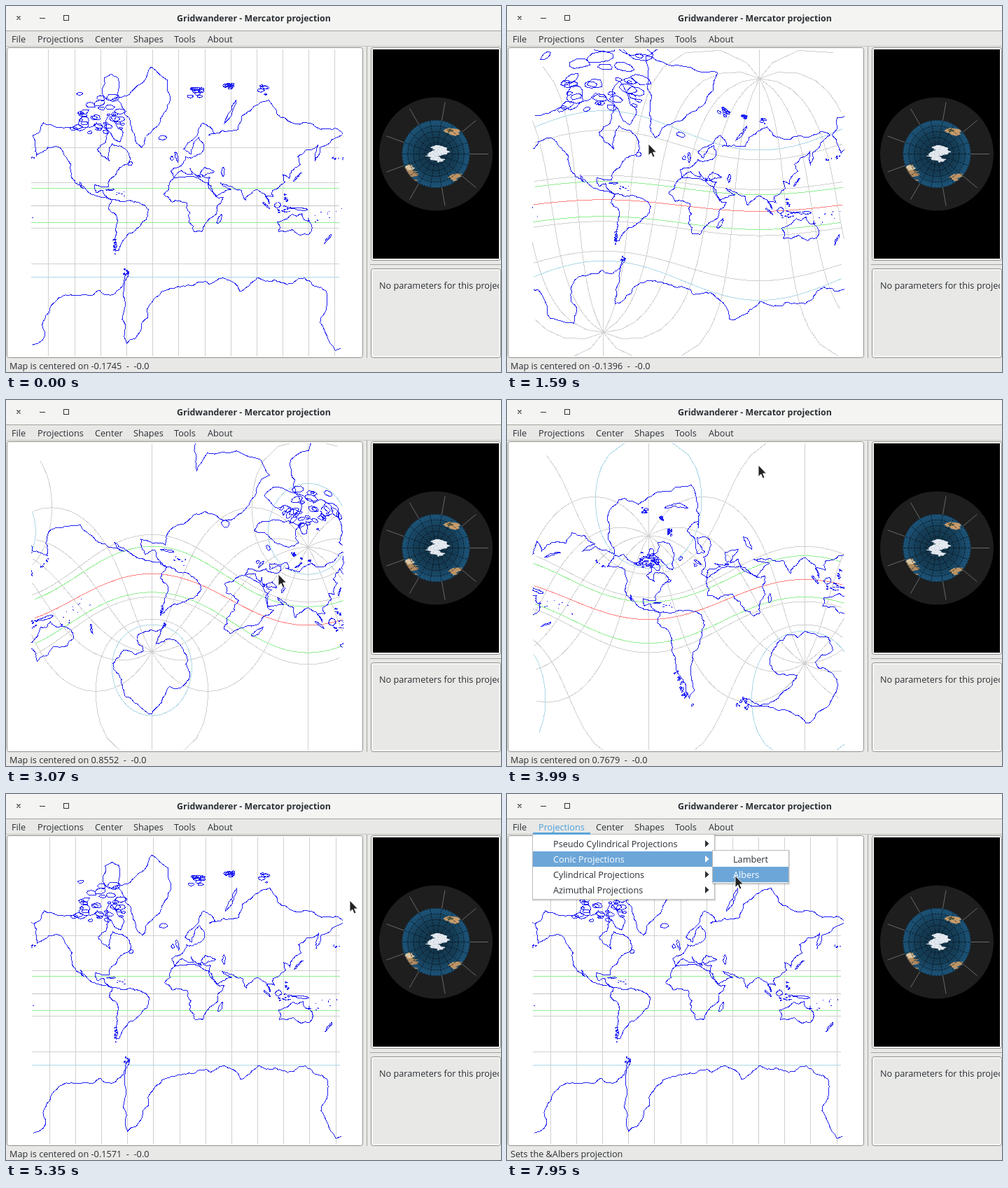
An HTML page that plays this animation: 707 by 523 pixels, repeating every 7.99 s.

```html
<!DOCTYPE html>
<html lang="en">
<head>
<meta charset="utf-8">
<title>Map projections</title>
<style>
html, body { margin: 0; width: 100%; height: 100%; overflow: hidden; background: #e8e8e6; }
svg { display: block; width: 100vw; height: 100vh; }
text { font: 12.7px 'Open Sans', 'Noto Sans', sans-serif; fill: #2a2f33; white-space: pre; }
.bold { font-weight: bold; font-size: 12.4px; text-anchor: middle; }
.thin { fill: none; stroke-width: 1; shape-rendering: crispEdges; }
</style>
</head>
<body>
<svg viewBox="0 0 707 523" xmlns="http://www.w3.org/2000/svg">
  <defs>
    <clipPath id="mapClip"><rect x="36" y="62" width="447" height="438"/></clipPath>
    <clipPath id="noteClip"><rect x="524" y="378" width="180" height="120"/></clipPath>
    <clipPath id="earthClip"><circle cx="614" cy="211.5" r="48.5"/></clipPath>
    <radialGradient id="sea"><stop offset="0" stop-color="#123247"/><stop offset=".6" stop-color="#153d56"/><stop offset="1" stop-color="#1d557a"/></radialGradient>
  </defs>
  <rect width="707" height="523" fill="#e8e8e6"/>
  <rect width="707" height="35" fill="#f4f4f3"/>
  <path class="thin" stroke="#a2a29e" d="M0 35.5H707"/>
  <path class="thin" stroke="#c4c4c0" d="M0 57.5H707"/>
  <path d="M15.5 14.5l5 5m0-5l-5 5M48 17.5h8" stroke="#333" stroke-width="1.2" fill="none"/>
  <rect class="thin" x="82.5" y="13.5" width="7" height="7" stroke="#333"/>
  <text class="bold" x="354" y="22">Gridwanderer - Mercator projection</text>
  <g id="bar"></g>

  <rect x="1.5" y="59.5" width="508" height="443" rx="3" fill="#fff" stroke="#92928e"/>
  <path class="thin" stroke="#a4a4a0" d="M515.5 58V503M520 369.5H707"/>
  <rect x="521.5" y="59.5" width="185" height="304" rx="3" fill="#f6f6f5" stroke="#92928e"/>
  <rect x="524" y="62" width="180" height="299"/>
  <rect x="521.5" y="375.5" width="185" height="127" rx="3" fill="#f6f6f5" stroke="#92928e"/>
  <rect x="524" y="378" width="180" height="122" fill="#e8e8e6"/>
  <text x="533" y="404" clip-path="url(#noteClip)">No parameters for this projection</text>

  <g id="globe"></g>
  <g id="map" clip-path="url(#mapClip)"></g>
  <text id="status" x="5" y="519"></text>

  <g id="menu">
    <rect x="36" y="58" width="262" height="95" fill="#000" opacity=".13"/>
    <rect x="36.5" y="57.5" width="260" height="93" fill="#fff" stroke="#b9b9b6"/>
    <rect x="37" y="55" width="82" height="3" fill="#5ba5da"/>
  </g>
  <g id="submenu">
    <rect x="294" y="81" width="110" height="49" fill="#000" opacity=".13"/>
    <rect x="293.5" y="80.5" width="109" height="47" fill="#fff" stroke="#b9b9b6"/>
  </g>
  <path id="cursor" d="M0 0V16.5L3.8 13L6.3 19L9 17.8L6.5 12H11.5Z" fill="#222" stroke="#fff" stroke-width=".9"/>
</svg>
<script>
const $ = id => document.getElementById(id);
const RAD = Math.PI / 180, LOOP = 7990;

function add(parent, tag, attrs, label) {
  const el = document.createElementNS('http://www.w3.org/2000/svg', tag);
  for (const k in attrs) el.setAttribute(k, attrs[k]);
  if (label) el.textContent = label;
  return parent.appendChild(el);
}

let seed = 11;
const rnd = () => (seed = seed * 16807 % 2147483647) / 2147483647;
const spread = w => (rnd() * 2 - 1) * w;
const range = (from, to, step) => Array.from({ length: (to - from) / step + 1 }, (_, i) => from + i * step);

// Corners of the mainlands as longitude, latitude; the coast between them is fractal
const corners = {
  northAmerica: [-168,66,-156,71,-115,68,-95,71,-82,68,-94,59,-80,51,-77,62,-65,60,-56,52,-65,47,-81,31,-81,25,-97,28,-95,18,-88,21,-83,10,-77,8,-105,20,-114,31,-110,23,-124,40,-124,48,-135,59,-151,60,-164,55,-168,66],
  southAmerica: [-77,8,-52,5,-35,-6,-41,-22,-58,-36,-69,-51,-73,-52,-71,-18,-81,-5,-77,8],
  greenland: [-32,83.6,-13,81.5,-22,71,-43,60,-54,69,-72,78,-32,83.6],
  eurasia: [28,71,41,67,34,66,68,68.5,72,73,104,77.5,130,71,180,69,190,66,163,60,157,51,160,61,137,54,140,48,128,40,127,35,120,39,122,31,108,21,109,12,100,13,104,2,97,17,90,22,77,8,72,21,57,26,48,30,60,22,44,13,34,30,36,36,27,37,41,42,30,46,23,37,13,45,16,39,3,43,-6,36,-9,43,-1,46,8,54,20,54.5,29,60,23,65,17,61,14,56,6,59,28,71],
  africa: [34,30,10,37,-10,31,-17,15,-8,5,9,4,13,-10,18,-34,26,-34,40,-15,51,11,43,12,34,30],
  australia: [114,-22,115,-34,131,-32,140,-38,150,-37,153,-26,142,-11,136,-15,131,-12,114,-22],
  antarctica: [-180,-84.5,-157,-83,-150,-78,-138,-74,-75,-73,-58,-64,-62,-75,-60,-83.5,-36,-79,-10,-71,50,-67,70,-72,90,-67,145,-67,170,-72,163,-80,180,-84.5]
};

// Larger islands: longitude, latitude, half width, half height, lean
const islands = [
  [-74,68,8,5,-6], [-78,80,10,2.5], [-110,71,7,2], [-56,49,2.5,1.5], [-19,65,5,1.3],
  [-2.5,54,1.8,4,-1.5], [-8,53,2,1.5], [59,74,2,3,6], [137,37,1.2,5,5], [47,-19,2,6.5,2],
  [141,-5,8,2,-4], [114,1,4,4], [101,0,1.5,5,-4], [172,-41,1,5,4.5], [-79,21.5,5,.7], [51,42,1.8,4.5]
];

// Island groups: count, longitude, latitude, spread across, spread up, size
const groupsOfIslands = [
  [34,-92,73,29,6,1.5], [18,122,-5,10,5,.9], [8,124,11,2,5,.8], [16,170,-13,24,10,.25],
  [10,-174,53,9,1,.4], [8,-66,17,6,4,.3], [16,-74,-48,1,6,.5], [12,20,79,7,1,.6],
  [10,55,80.5,7,.4,.4], [5,97,79.5,4,1,.7], [8,-60,-64,4,1.5,.4], [8,24,37,3,2,.3]
];

const pairs = flat => range(0, flat.length - 2, 2).map(i => [flat[i], flat[i + 1]]);

// Midpoint displacement from a to b, without b
function crag(a, b) {
  const wide = Math.max(.12, Math.cos(a[1] * RAD));
  const dx = (b[0] - a[0]) * wide, dy = b[1] - a[1];
  if (Math.hypot(dx, dy) < 1.1) return [a];
  const k = spread(.16);
  const mid = [(a[0] + b[0]) / 2 - dy * k / wide, (a[1] + b[1]) / 2 + dx * k];
  return [...crag(a, mid), ...crag(mid, b)];
}
const rough = pts => [...pts.slice(1).flatMap((p, i) => crag(pts[i], p)), pts[pts.length - 1]];

function blob(x, y, w, h, lean = 0) {
  const pts = range(0, 315, 45).map(deg => {
    const q = .75 + rnd() * .4, s = q * Math.sin(deg * RAD);
    return [x + w * q * Math.cos(deg * RAD) + lean * s, y + h * s];
  });
  return [...pts, pts[0]];
}

const islets = ([n, lon, lat, w, h, r]) => range(1, n, 1).map(() => {
  const x = lon + spread(w), y = lat + spread(h), q = r * (.3 + rnd());
  return blob(x, y, q / Math.cos(y * RAD), q * .5, spread(q));
});

const unit = ([lon, lat]) => {
  const c = Math.cos(lat * RAD);
  return [c * Math.cos(lon * RAD), c * Math.sin(lon * RAD), Math.sin(lat * RAD)];
};
const toUnits = lines => lines.map(l => l.map(unit));

const land = toUnits([
  ...Object.values(corners).map(c => rough(pairs(c))),
  ...islands.map(i => rough(blob(...i))),
  ...groupsOfIslands.flatMap(islets)
]);
const parallel = lat => range(-180, 180, 5).map(lon => [lon, lat]);
const meridians = range(-180, 150, 30).map(lon => range(-90, 90, 3).map(lat => [lon, lat]));
const GRAY = '#d0d0d0', GREEN = '#90ee90', BLUE = '#add8e6', RED = '#ff8080';

const layer = (stroke, lines) => ({ lines: toUnits(lines), el: add($('map'), 'path', { class: 'thin', stroke }) });
layer.all = [layer(GRAY, [...meridians, ...[-60, -30, 30, 60].map(parallel)])];
const [north, south, tropics, equator] = [[BLUE, 66.56], [BLUE, -66.56], [GREEN, 23.44, -23.44], [RED, 0]]
  .map(([color, ...lats]) => layer(color, lats.map(parallel)));
const coast = { lines: land, el: add($('map'), 'path', { class: 'thin', stroke: '#2020f4' }) };
const layers = [...layer.all, north, south, tropics, equator, coast];

// Tilt about the axis through 0,0, turn about the poles, then project from inside the globe
function trace(lines, turn, tilt) {
  const c = Math.cos(tilt), s = Math.sin(tilt);
  let d = '';
  for (const line of lines) {
    let last = 99;
    for (const [x, y, z] of line) {
      const up = z * c - y * s;
      let lon = Math.atan2(y * c + z * s, x) + turn;
      lon -= 2 * Math.PI * Math.round(lon / (2 * Math.PI));
      const px = 259.2 + 71 * lon, py = 285.1 - 72 * up / (.25 + Math.sqrt(Math.max(0, 1 - up * up)));
      d += (Math.abs(lon - last) > Math.PI ? 'M' : 'L') + px.toFixed(1) + ' ' + py.toFixed(1);
      last = lon;
    }
  }
  return d;
}

const show = (el, on) => el.setAttribute('display', on ? 'inline' : 'none');
let shown = '';
function drawMap(turn, tilt) {
  const key = turn + '/' + tilt;
  if (key === shown) return;
  shown = key;
  for (const l of layers) l.el.setAttribute('d', trace(l.lines, turn * RAD, tilt * RAD));
  show(north.el, tilt);
  equator.el.setAttribute('stroke', tilt ? RED : '#c2c2c0');
}

function drawGlobe() {
  const g = $('globe'), cx = 614, cy = 211.5;
  const rays = (step, a, b) => range(0, 360 - step, step).map(deg => {
    const c = Math.cos(deg * RAD), s = Math.sin(deg * RAD);
    return `M${cx + a * c} ${cy + a * s}L${cx + b * c} ${cy + b * s}`;
  }).join('');
  add(g, 'circle', { cx, cy, r: 81, fill: '#1e1e1e' });
  add(g, 'path', { d: rays(40, 47, 75), stroke: '#7c7c7c', 'stroke-width': .8 });
  add(g, 'circle', { cx, cy, r: 48.5, fill: 'url(#sea)' });
  const earth = add(g, 'g', { 'clip-path': 'url(#earthClip)' });
  const patch = (fill, ...shape) => add(earth, 'path', { d: 'M' + rough(blob(...shape)).join('L'), fill });
  patch('#b08a60', 580, 241, 9, 14, 6);
  patch('#d9c6a2', 576, 231, 7, 4);
  patch('#c89c6c', 637, 179, 11, 6, 5);
  patch('#6a6740', 634, 178, 5, 2);
  patch('#bd9466', 642, 244, 10, 6, -3);
  const grid = { fill: 'none', stroke: '#07141e', 'stroke-width': .8, 'stroke-dasharray': '3 1.5' };
  for (const r of range(8, 48, 8)) add(earth, 'circle', { cx, cy, r, ...grid });
  add(earth, 'path', { d: rays(20, 8, 49), ...grid });
  patch('#e3e8ef', 616, 210, 14, 13);
  add(earth, 'path', { d: rays(60, 3, 13), ...grid, stroke: '#8e9aa8', 'stroke-dasharray': '1 3' });
}
drawGlobe();

const bar = [['File', 8], ['Projections', 45], ['Center', 127], ['Shapes', 182], ['Tools', 240], ['About', 288]]
  .map(([label, x]) => add($('bar'), 'text', { x, y: 52 }, label));

function item(parent, label, x, y, left, width, arrow) {
  const back = add(parent, 'rect', { x: left, y, width, height: 22, fill: '#6ca6d8' });
  const text = add(parent, 'text', { x, y: y + 16 }, label);
  const tip = arrow && add(parent, 'path', { d: `M283 ${y + 6}l5.5 5-5.5 5z` });
  return on => {
    back.setAttribute('opacity', +on);
    text.style.fill = on ? '#fff' : '';
    if (tip) tip.setAttribute('fill', on ? '#fff' : '#2a2f33');
  };
}
const families = ['Pseudo Cylindrical', 'Conic', 'Cylindrical', 'Azimuthal']
  .map((name, i) => item($('menu'), name + ' Projections', 66, 60 + 22 * i, 37, 259, true));
const conics = ['Lambert', 'Albers'];
const choices = conics.map((name, i) => item($('submenu'), name, 323, 82 + 22 * i, 294, 108));

// Pointer: time, x, y
const pointer = [
  [160, 307, 58], [840, 168, 149], [1110, 168, 149], [1590, 202, 197], [3070, 389, 249],
  [3990, 359, 93], [4590, 248, 177], [4970, 677, 200], [5110, 677, 200], [5870, 88, 48],
  [6510, 88, 48], [6870, 110, 88], [7320, 324, 91], [7830, 328, 107], [7950, 326, 117]
];
// Map: time, turn, tilt
const view = [
  [1070, -10, 0], [1590, -8, 8.2], [3070, 49, 33.6], [3990, 44, -27],
  [4590, -3, -10.2], [4970, -10, -2], [5110, -10, -2], [5270, -9, 0]
];

function at(keys, t) {
  const i = keys.findIndex(k => k[0] > t);
  const a = keys[i < 0 ? keys.length - 1 : Math.max(0, i - 1)], b = i < 0 ? a : keys[i];
  const s = Math.max(0, t - a[0]) / (b[0] - a[0] || 1);
  return [a[1] + (b[1] - a[1]) * s, a[2] + (b[2] - a[2]) * s];
}

function draw(ms) {
  const t = Math.floor((ms - 30) / 40) * 40 + 30;
  const [turn, tilt] = at(view, t), whole = Math.round(turn);
  drawMap(whole, tilt);

  const open = t >= 6110, family = t < 6670 ? -1 : t < 6870 ? 0 : 1;
  const choice = t < 7270 ? -1 : t < 7510 ? 0 : 1;
  show($('menu'), open);
  show($('submenu'), t >= 7070);
  families.forEach((set, i) => set(i === family));
  choices.forEach((set, i) => set(i === choice));
  bar[1].style.fill = open ? '#4a9fd8' : '';

  const angle = whole ? +(whole * RAD).toFixed(4) : '0.0';
  $('status').textContent = choice >= 0 ? `Sets the &${conics[choice]} projection`
    : family >= 0 ? '' : `Map is centered on ${angle}  -  -0.0`;

  const [x, y] = at(pointer, t);
  show($('cursor'), t >= 150);
  $('cursor').setAttribute('transform', `translate(${Math.round(x)} ${Math.round(y)})`);
}

const start = performance.now();
function tick() {
  draw((performance.now() - start) % LOOP);
  requestAnimationFrame(tick);
}
tick();
</script>
</body>
</html>
```
